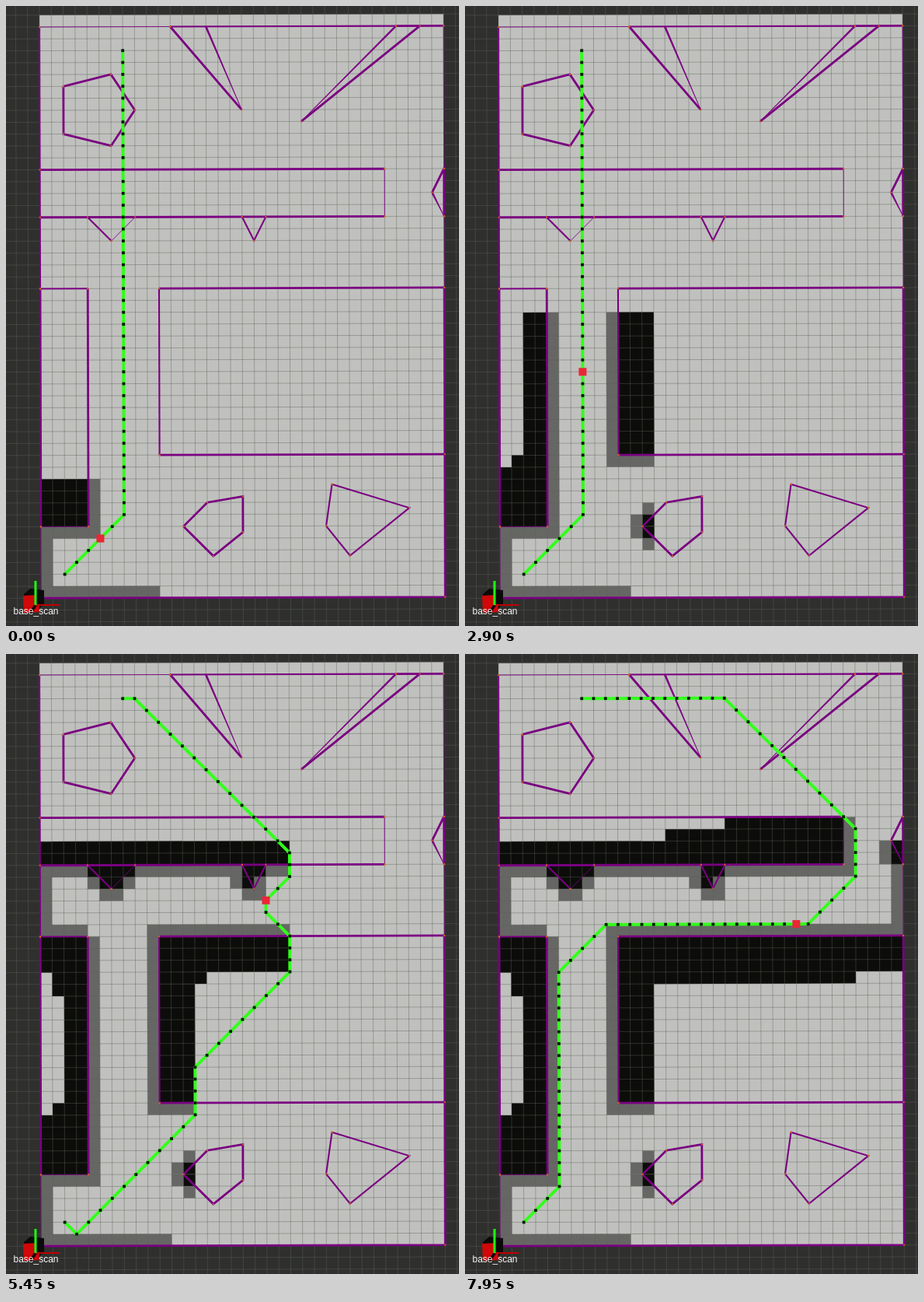
Write an HTML page with a canvas that moves like this. It is 583 by 797 pixels and loops after 8 s.

```html
<!DOCTYPE html>
<html lang="en">
<head>
<meta charset="utf-8">
<title>Grid planner</title>
<style>
html, body { margin: 0; width: 100%; height: 100%; overflow: hidden; background: #2f302e; }
canvas { display: block; }
</style>
</head>
<body>
<canvas id="stage" width="583" height="797"></canvas>
<script>
const ctx = document.getElementById('stage').getContext('2d');
const LOOP = 8000, STEP = 211, LEAD = 77, FIRST = 3, RANGE = 5;
const COLS = 34, ROWS = 49;

// Map cells to screen, with the slight camera roll
const CELL = 15.296, ROLL = 0.045, LEFT = 45.2, BOTTOM = 761.2;
const toX = (u, v) => LEFT + CELL * u - ROLL * v;
const toY = (u, v) => BOTTOM - ROLL * u - CELL * v;

// Blocked cells as u, v, width, height: outer walls, blocks, small shapes
const solid = [
  [-1, 0, 1, ROWS], [COLS, 0, 1, ROWS], [0, -1, COLS, 1],
  [0, 6, 4, 20], [10, 12, 24, 14], [0, 32, 29, 4],
  [4, 31, 4, 1], [5, 30, 2, 1], [17, 31, 2, 1], [17, 30, 1, 1],
  [33, 32, 1, 2], [12, 5, 1, 2]
];
// Safety margin: one cell to each side, and some corners
const corners = [[4, 5], [9, 11], [9, 26], [29, 31], [18, 29]];
const margin = [
  ...solid.map(([u, v, w, h]) => [u - 1, v, w + 2, h]),
  ...solid.map(([u, v, w, h]) => [u, v - 1, w, h + 2]),
  ...corners.map(([u, v]) => [u, v, 1, 1])
];

// Drawn edges by line weight
const outlines = [
  [2.8, '0,0 34,0 34,26|0,6 0,26|4,26 4,6|10,26 34,26|10,12 34,12|34,32 34,36 33,34'
    + '|11,48 17,41|32,48 22,40|30,48 34,48|0,36 29,36|0,32 29,32'
    + '|2,43 6,44 8,41 6,38 2,39 2,43|12,6 14,8 17,8.5 17,5.5 14.5,3.5 12,6'],
  [2.1, '0,26 0,48|11,48 30,48|0,26 4,26|10,12 10,26|4,32 6,30|17,32 18,30 19,32'
    + '|24.5,9.5 31,7.5 26,3.5 24,6 24.5,9.5'],
  [0.9, '0,0 0,6 4,6|0,48 11,48|34,26 34,32|34,36 34,48|29,32 29,36|6,30 8,32']
].map(([w, s]) => [w, s.split('|').map(parse)]);
const wedges = ['14,48 17,41', '30,48 22,40', '33,34 34,32'].map(parse);

// Routes from start to goal, each in use from the given step on
const left = '6,6 6,28 5,28 1,32 1,40';
const plans = [
  [0, '7,7'],
  [24, left],
  [25, '7,7 7,26 8,27 8,45'],
  [26, left],
  [28, '3,1 13,11 13,24 15,26 15,38'],
  [29, '3,1 13,11 13,15 21,23 21,26 19,28 19,29 21,31 21,33 8,46'],
  [30, '3,1 13,11 13,14 25,26 24,27 24,30 25,31 25,35 14,46'],
  [31, '3,1 13,11 15,11 30,26 30,27 29,28 28,28 30,30 30,35 19,46'],
  [32, '5,5 5,23 9,27 26,27 30,31 30,35 19,46']
].map(([from, s]) => ({ from, nodes: walk(parse(`2,2 ${s} 7,46`)) }));

function parse(s) {
  return s.split(' ').map(p => p.split(',').map(Number));
}

// Every grid node along a route
function walk(pts) {
  const out = [pts[0]];
  for (let i = 1; i < pts.length; i++) {
    const [a, b] = pts[i - 1], [c, d] = pts[i];
    const n = Math.max(Math.abs(c - a), Math.abs(d - b));
    for (let k = 1; k <= n; k++) out.push([a + (c - a) * k / n, b + (d - b) * k / n]);
  }
  return out;
}

function planAt(step) {
  return plans.filter(p => p.from <= step).pop().nodes;
}

function clipTo(list) {
  ctx.beginPath();
  list.forEach(r => ctx.rect(...r));
  ctx.clip();
}

function fillCells(list, color) {
  ctx.beginPath();
  list.forEach(r => ctx.rect(...r));
  ctx.fillStyle = color;
  ctx.fill();
}

function line(pts, width, color) {
  ctx.beginPath();
  pts.forEach(([u, v]) => ctx.lineTo(toX(u, v), toY(u, v)));
  ctx.lineWidth = width;
  ctx.strokeStyle = color;
  ctx.stroke();
}

function poly(color, ...pts) {
  ctx.beginPath();
  pts.forEach(p => ctx.lineTo(...p));
  ctx.fillStyle = color;
  ctx.fill();
}

// Edge that thins out towards its end
function wedge([a, b], color) {
  const [x, y, p, q] = [toX(...a), toY(...a), toX(...b), toY(...b)];
  const len = Math.hypot(p - x, q - y), nx = (y - q) / len, ny = (p - x) / len;
  const w = 1.3, e = 0.4;
  poly(color, [x + nx * w, y + ny * w], [p + nx * e, q + ny * e],
    [p - nx * e, q - ny * e], [x - nx * w, y - ny * w]);
}

function dot([u, v], size, color) {
  ctx.fillStyle = color;
  ctx.fillRect(toX(u, v) - size / 2, toY(u, v) - size / 2, size, size);
}

// The map shows only cells that earlier positions had in range
function drawMap(step) {
  const sheet = [[0, 0, COLS, ROWS]], size = 2 * RANGE + 1;
  const seen = Array.from({ length: step }, (_, i) => {
    const [u, v] = planAt(i)[i];
    return [u - RANGE, v - RANGE, size, size];
  });
  ctx.save();
  ctx.transform(CELL, -ROLL, -ROLL, -CELL, LEFT, BOTTOM);
  fillCells(sheet, '#c0c1be');
  clipTo(sheet);
  clipTo(seen);
  fillCells(margin, '#666764');
  fillCells(solid, '#0c0d0a');
  ctx.restore();
}

function drawGrid() {
  const color = 'rgba(92,96,88,0.42)';
  for (let u = -4; u <= 37; u++) line([[u, -4], [u, 52]], 1, color);
  for (let v = -4; v <= 52; v++) line([[-4, v], [37, v]], 1, color);
}

function drawOutlines() {
  const purple = '#7a0080', orange = '#c8622a';
  outlines.forEach(([w, lines]) => lines.forEach(pts => line(pts, w, purple)));
  wedges.forEach(pts => wedge(pts, purple));
  outlines.forEach(([, lines]) => lines.flat().forEach(p => dot(p, 2, orange)));
}

function drawAxes() {
  poly('#0b0b0a', [23, 756], [31, 749], [49, 751], [49, 769], [41, 776], [23, 776]);
  poly('#d00808', [22, 758], [42, 757], [43, 779], [23, 780]);
  poly('#0b0b0a', [38, 753], [49, 751], [49, 768], [39, 769]);
  poly('#16020a', [29, 780], [37, 769], [40, 771], [32, 782]);
  ctx.fillStyle = '#c00000';
  ctx.fillRect(38, 769, 31, 2);
  ctx.fillStyle = '#1fff12';
  ctx.fillRect(36.5, 739, 3, 31);
  ctx.fillStyle = '#f4f4f4';
  ctx.font = '12px "Liberation Sans", Arial, sans-serif';
  ctx.fillText('base_scan', 9.5, 782);
}

function draw(t) {
  const step = FIRST + Math.floor((t + LEAD) / STEP);
  const route = planAt(step);
  ctx.fillStyle = '#2f302e';
  ctx.fillRect(0, 0, 583, 797);
  drawMap(step);
  drawGrid();
  drawOutlines();
  line(route, 4, '#33ff1c');
  route.forEach(p => dot(p, 3.8, '#071a04'));
  dot(route[step], 10, '#ea2637');
  drawAxes();
}

function tick() {
  draw(performance.now() % LOOP);
  requestAnimationFrame(tick);
}
tick();
</script>
</body>
</html>
```
